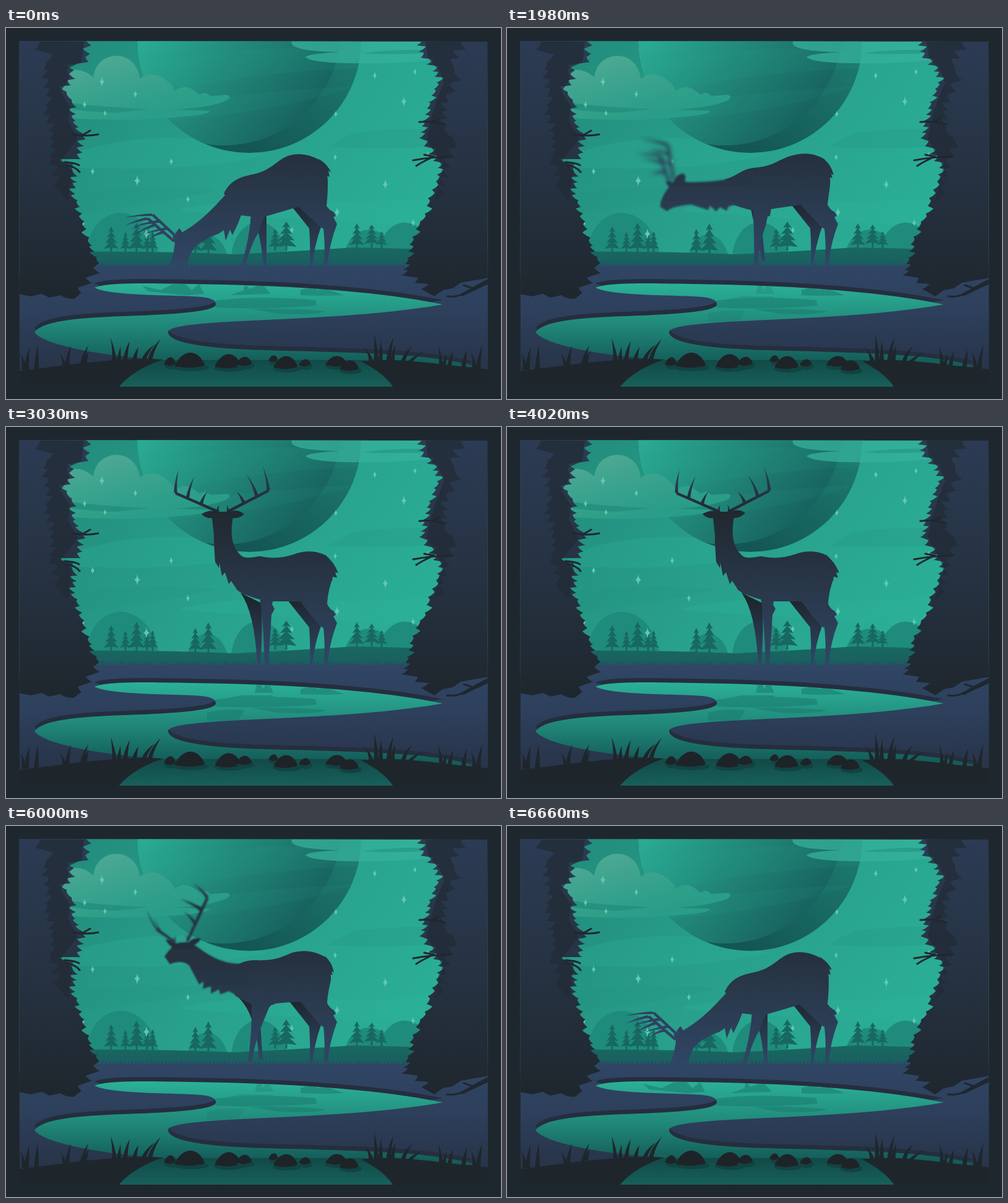
These frames come from a looping animation (800 px wide and 600 px high, 9030 ms). An HTML page:

```html
<!DOCTYPE html>
<html lang="en">
<head>
<meta charset="utf-8">
<title>Deer by the pond</title>
<style>
html, body { margin: 0; width: 100%; height: 100%; overflow: hidden; background: #1f272e; }
svg { display: block; width: 100%; height: 100%; }
</style>
</head>
<body>
<svg viewBox="0 0 800 600">
  <defs>
    <clipPath id="stage"><path d="M21 21L778 22 779 580H22Z"/></clipPath>
    <linearGradient id="sky" x1="0" y1=".25" x2="1" y2=".6"><stop stop-color="#228b7b"/><stop offset=".45" stop-color="#289f8b"/><stop offset="1" stop-color="#2bb198"/></linearGradient>
    <linearGradient id="moon" gradientUnits="userSpaceOnUse" x1="235" y1="10" x2="455" y2="205"><stop stop-color="#2aaa93"/><stop offset=".4" stop-color="#228a7b"/><stop offset="1" stop-color="#165d5b"/></linearGradient>
    <linearGradient id="shade" gradientUnits="userSpaceOnUse" x1="540" y1="20" x2="400" y2="200"><stop stop-color="#1d7a6f"/><stop offset="1" stop-color="#145655"/></linearGradient>
    <linearGradient id="cloud" gradientUnits="userSpaceOnUse" x1="170" y1="45" x2="200" y2="150"><stop stop-color="#4ca893"/><stop offset=".6" stop-color="#35a18c"/><stop offset="1" stop-color="#2a9d88"/></linearGradient>
    <linearGradient id="far" x2="0" y2="1"><stop stop-color="#18695f"/><stop offset="1" stop-color="#1b5a61"/></linearGradient>
    <linearGradient id="land" gradientUnits="userSpaceOnUse" x1="0" y1="384" x2="0" y2="560"><stop stop-color="#304665"/><stop offset=".45" stop-color="#2d3f5b"/><stop offset="1" stop-color="#273347"/></linearGradient>
    <linearGradient id="water" gradientUnits="userSpaceOnUse" x1="0" y1="414" x2="0" y2="540"><stop stop-color="#2bb097"/><stop offset=".5" stop-color="#218a7b"/><stop offset="1" stop-color="#145d59"/></linearGradient>
    <linearGradient id="pool" x2="0" y2="1"><stop stop-color="#124a48"/><stop offset="1" stop-color="#17605a"/></linearGradient>
    <linearGradient id="wood" gradientUnits="userSpaceOnUse" x1="0" y1="22" x2="0" y2="430"><stop stop-color="#2c3b54"/><stop offset=".5" stop-color="#263343"/><stop offset="1" stop-color="#1f272e"/></linearGradient>
    <linearGradient id="coat" gradientUnits="userSpaceOnUse" x1="0" y1="130" x2="0" y2="384"><stop stop-color="#20282f"/><stop offset=".35" stop-color="#263240"/><stop offset="1" stop-color="#304665"/></linearGradient>
    <linearGradient id="dim" gradientUnits="userSpaceOnUse" x1="0" y1="278" x2="0" y2="375"><stop stop-color="#1e252c"/><stop offset="1" stop-color="#2f4564"/></linearGradient>
    <linearGradient id="horn" gradientUnits="userSpaceOnUse" x1="0" y1="70" x2="0" y2="340"><stop stop-color="#2d3d5a"/><stop offset=".25" stop-color="#212931"/><stop offset=".5" stop-color="#29384f"/><stop offset="1" stop-color="#2e4362"/></linearGradient>
    <filter id="soft" filterUnits="userSpaceOnUse" x="150" y="30" width="330" height="380"><feGaussianBlur id="softBlur"/></filter>
    <filter id="smear" filterUnits="userSpaceOnUse" x="150" y="30" width="330" height="380"><feGaussianBlur id="smearBlur"/></filter>
  </defs>
  <g clip-path="url(#stage)">
    <path fill="url(#sky)" d="M20 20H780V400H20Z"/>
    <g fill="#2fb49b" opacity=".25">
      <path d="M100 205Q270 150 420 205Q300 235 100 225Z"/>
      <path d="M284 292Q400 270 560 282L700 275V320Q420 308 284 296Z"/>
    </g>
    <path fill="#21907f" opacity=".25" d="M560 170Q640 160 700 165V190Q620 198 520 192ZM100 270Q200 250 340 262Q230 290 100 300Z"/>
    <circle cx="393" cy="21" r="181" fill="url(#shade)"/>
    <clipPath id="disc"><circle cx="393" cy="21" r="181"/></clipPath>
    <g clip-path="url(#disc)">
      <circle cx="352" cy="0" r="190" fill="url(#moon)"/>
      <path fill="#30b199" opacity=".08" d="M212 60Q400 20 560 40L570 65Q400 70 230 110ZM240 130Q400 100 560 95Q450 135 260 150Z"/>
    </g>
    <path fill="url(#cloud)" d="M90 72Q120 60 141 80C146 33 212 33 216 82Q238 66 262 87 271 94 272 102Q290 88 308 104L313 108Q322 101 330 110L356 108Q366 110 357 117Q330 129 270 132L329 134Q328 140 290 143Q200 152 105 146L85 130Z"/>
    <path fill="#25917f" d="M98 120Q150 128 232 131L180 137Q130 136 100 130Z"/>
    <path fill="#36b29b" opacity=".75" d="M463 20Q455 31 490 36Q515 39 540 39Q490 41 484 47Q492 56 560 57Q640 58 690 51V20Z"/>
    <path fill="#289e8a" d="M575 41Q630 33 690 36V40Q630 44 575 41Z"/>
    <g fill="#1f8b7c">
      <path d="M130 362C138 280 228 276 246 362ZM294 368C300 324 346 322 358 368ZM364 368C372 297 444 295 454 368ZM548 360C560 316 610 314 630 360ZM600 362C615 300 670 298 695 362Z"/>
    </g>
    <path fill="url(#far)" d="M20 362Q250 360 370 366Q460 362 560 355Q640 356 780 362V392H20Z"/>
    <g id="pines" fill="#176860"></g>
    <g id="stars" fill="#62c9b1"></g>
    <g id="deer" fill="url(#coat)">
      <path id="farLeg" fill="url(#dim)"/>
      <path fill="url(#dim)" d="M455 280L490 324Q492 350 491 384L495 384Q499 350 509 322L482 280Z"/>
      <path id="tail"/>
      <path id="torso"/>
      <path id="nearLeg"/>
      <g id="head"><path id="neck"/><path id="earL"/><path id="earR"/></g>
      <g id="antlers" fill="url(#horn)"></g>
    </g>
    <path id="turf" fill="url(#land)"/>
    <path id="rim" fill="#252e3e" transform="translate(0 -7)"/>
    <path id="pond" fill="url(#water)"/>
    <clipPath id="pondClip"><path id="pondEdge"/></clipPath>
    <g clip-path="url(#pondClip)" fill="#1c7d70" opacity=".6">
      <path d="M338 441Q400 432 500 440L502 449Q420 456 338 452ZM398 455Q450 452 518 458Q500 465 440 462ZM476 424L490 420 492 414H498L502 424 516 420 518 414 524 424 546 432Q510 434 476 432Z"/>
      <path id="refDown" d="M220 417L250 424 270 414H290L300 424 312 414 320 430 290 432 230 426ZM362 432L384 424 386 414 394 422 414 414 428 430Z"/>
      <path id="refUp" d="M325 462Q350 455 385 458L375 475H325ZM350 440L380 434H430L445 446 360 452ZM402 430L406 414H411L416 424 420 414H425L432 430Z"/>
    </g>
    <path fill="url(#pool)" d="M245 537H580C600 550 615 565 626 580H182C195 560 220 545 245 537Z"/>
    <path fill="#1e262c" d="M20 555C100 545 180 532 254 536C220 548 198 562 182 581H20ZM626 581C612 560 592 549 574 539C640 532 710 546 780 552V581Z"/>
    <g id="stones" fill="#1e2328"></g>
    <g id="blades" fill="#1e262c"></g>
    <g id="woods"></g>
    <g fill="none" stroke="#1f272f" stroke-width="3" stroke-linecap="round">
      <path d="M108 172Q130 176 149 172M122 174L136 166M95 217Q112 218 118 222M98 222Q112 224 119 233M720 208Q690 208 658 214M692 208L676 205M685 211Q672 217 663 223M710 156Q690 150 668 152M700 146L690 152M778 408Q755 420 742 428Q730 436 713 434M752 420L740 416"/>
      <path stroke-width="5" d="M778 412Q752 424 738 431"/>
    </g>
  </g>
</svg>
<script>
const $ = id => document.getElementById(id);
const LOOP = 9030;
const path = d => `<path d="${d}"/>`;

// Scenery
const sparkles = [[155,87,8],[209,107,6],[127,124,6],[160,138,5],[267,216,6],[140,232,6],[212,247,9],[294,277,6],[124,316,6],[227,333,9],
  [596,77,6],[661,71,5],[643,119,8],[533,139,5],[532,209,5],[613,253,8],[535,298,8],[462,327,6],[658,315,6],[682,205,5]];
$('stars').innerHTML = sparkles.map(([x, y, r]) => {
  const s = r * .55;
  return path(`M${x} ${y - r}Q${x + 1} ${y - 1} ${x + s} ${y}Q${x + 1} ${y + 1} ${x} ${y + r}Q${x - 1} ${y + 1} ${x - s} ${y}Q${x - 1} ${y - 1} ${x} ${y - r}Z`);
}).join('');

function pine([x, top, base, w]) {
  const h = base - top - 4;
  let d = `M${x - 1.5} ${base + 2}V${top + 5}H${x + 1.5}V${base + 2}Z`;
  for (let i = 0; i < 4; i++) {
    const y = top + h * (i + 1) / 4, r = w / 2 * (.4 + .2 * i);
    d += `M${x} ${top + h * i / 5}L${x + r} ${y}L${x} ${y - 2}L${x - r} ${y}Z`;
  }
  return path(d);
}
$('pines').innerHTML = [[170,321,361,24],[193,330,361,18],[211,315,361,28],[228,331,361,18],[237,329,361,18],[306,325,364,22],[327,316,364,28],
  [435,325,358,22],[453,313,358,34],[567,316,355,24],[591,318,353,26],[607,329,355,20]].map(pine).join('');

let turf = 'M20 386';
for (let x = 22; x < 780; x += 6) {
  const h = 2 + 3 * Math.abs(Math.sin(x * 1.7)) * Math.abs(Math.sin(x * .13));
  turf += `L${x} 385L${x + 2} ${384 - h * 1.3}L${x + 4} 385`;
}
$('turf').setAttribute('d', turf + 'L780 386V580H20Z');

const shore = 'M143 420C165 411 230 413 300 414C450 416 600 425 706 447C610 464 500 468 400 473C310 477 262 482 262 492C264 512 340 519 420 521C560 525 690 526 757 547L640 560 626 580H182L245 536C150 530 60 512 46 492C60 474 110 469 190 466C280 463 335 458 339 448C341 438 325 435 300 434C250 432 165 432 143 420Z';
for (const id of ['rim', 'pond', 'pondEdge']) $(id).setAttribute('d', shore);

const mounds = [[265,534,545,9],[297,523,548,24],[359,526,549,21],[385,533,545,12],[432,532,539,7],[452,530,550,19],[483,538,546,9],[534,531,546,17],[555,538,553,15]];
$('stones').innerHTML = mounds.map(([x, top, base, r]) =>
  `<ellipse cx="${x + 2}" cy="${base + 1}" rx="${r * 1.2}" ry="6" fill="#114341"/>` +
  path(`M${x - r} ${base - 3}C${x - r * .5} ${top - 3} ${x + r * .5} ${top - 6} ${x + r} ${base - 4}Q${x + r} ${base} ${x + r * .5} ${base}Q${x} ${base + 3} ${x - r * .7} ${base}Q${x - r - 2} ${base} ${x - r} ${base - 3}Z`)).join('');

// Each blade: base x, tip x, tip y
const blades = [[29,24,527],[33,38,516],[49,51,513],[95,87,526],[98,105,513],[122,133,513],[126,134,522],[175,169,501],[182,185,515],[192,200,506],[207,214,516],[232,250,503],[222,240,512],
  [590,577,514],[598,595,495],[605,606,506],[618,626,501],[624,629,513],[641,656,514],[650,673,525],[703,699,515],[707,712,527],[716,723,522],[739,745,520],[763,770,513],[757,752,525]];
$('blades').innerHTML = blades.map(([b, x, y]) => {
  const foot = 553 - 12 * Math.exp(-(((Math.abs(b - 412) - 195) / 60) ** 2));
  return path(`M${b - 4} ${foot}Q${b - 2} ${(foot + y) / 2} ${x} ${y}Q${b + 4} ${(foot + y) / 2 + 4} ${b + 4} ${foot}Z`);
}).join('');

// Drooping needles along a line of [x, y] anchors; side is the way they point
function needles(line, side, depth, step) {
  let d = '', n = 0;
  for (let i = 0; i + 1 < line.length; i++) {
    const [x0, y0] = line[i], [x1, y1] = line[i + 1];
    const count = Math.max(1, Math.round((y1 - y0) / step));
    for (let k = 0; k < count; k++, n++) {
      const x = x0 + (x1 - x0) * k / count, y = y0 + (y1 - y0) * k / count;
      const dep = depth * (.8 + .4 * Math.sin(n * 2.3));
      d += `L${x - side * dep} ${y - step + 3}Q${x - side * dep * .4} ${y - 2} ${x + side * 2} ${y}`;
    }
  }
  return d;
}
const leftEdge = [[136,28],[132,55],[108,68],[110,82],[96,103],[112,128],[110,150],[127,180],[119,212],[97,220],[114,240],[110,268],[121,300],[128,325],[137,352],[149,380],[150,396],[137,412],[120,428],[110,438]];
const rightEdge = [[666,28],[672,48],[691,70],[698,88],[685,120],[676,150],[670,178],[684,204],[700,226],[697,248],[684,275],[679,300],[664,325],[654,350],[650,372],[641,400],[662,412],[684,432]];
const leftDark = [[48,35],[66,55],[58,80],[66,110],[62,140],[72,180],[70,220],[84,270]];
const rightDark = [[742,35],[722,62],[734,84],[715,120],[709,160],[728,192],[712,240],[704,280]];
const dark = 'fill="#222b36"';
$('woods').innerHTML =
  `<path fill="url(#wood)" d="M20 20H130${needles(leftEdge, 1, 9, 11)}L110 438Q95 438 88 432L70 436 58 430 40 434 20 430Z"/>` +
  `<path fill="url(#wood)" d="M780 20H672${needles(rightEdge, -1, 9, 11)}L692 434 706 424 722 421 735 412 780 404Z"/>` +
  `<path ${dark} opacity=".75" d="M84 270L52 22${needles(leftDark, -1, 9, 15)}L100 280L108 220 88 215 116 180 100 150 104 128 88 103 102 82 98 66 122 55 126 22 52 22Z"/>` +
  `<path ${dark} opacity=".75" d="M704 280L738 22${needles(rightDark, 1, 9, 15)}L692 280 706 226 694 204 680 178 686 150 695 120 708 88 701 70 682 48 678 22 738 22Z"/>`;

// Deer poses: grazing, rising, sinking, standing. Matching paths are blended number by number.
const hind = 'Q523 295 530 298L533 304 529 306 535 317Q524 345 519 384L514 384Q516 350 513 325L508 322';
const graze = {
  torso: `M352 268C362 245 382 240 402 236C428 230 438 214 455 207C472 201 490 204 508 214Q521 226 520 255Q520 270 518 288${hind}Q485 300 472 289Q440 299 418 305Q400 306 380 303Z`,
  tail: 'M506 212Q520 221 525 233L521 231 523 241 519 239 519 245L508 228Z',
  neck: 'M375 250C352 268 330 305 284 331L279 328 274 336L273 348Q270 370 264 385L293 385Q296 362 310 350L330 338 343 333 352 327 355 344 362 326 366 335 375 316 380 303L395 295Z',
  nearLeg: 'M396 300Q394 340 380 384L387 384Q398 345 408 331L413 316 419 304 428 290Z',
  farLeg: 'M404 318Q412 340 416 384L421 384Q421 340 421 302Z',
  earL: 'M276 338Q273 334 270 333Q269 342 274 350Z',
  earR: 'M285 333Q284 327 280 324Q273 330 275 340Z',
  hornL: '272 345 229 308 192 320 207 335 232 341',
  hornR: '277 339 237 302 191 307 203 323 222 334'
};
const rise = {
  torso: `M352 245C372 240 378 228 400 226C430 224 436 214 458 207C478 200 500 203 514 213Q524 228 522 255Q520 270 518 286${hind}Q488 300 474 286Q440 291 425 293Q412 303 366 286Z`,
  tail: 'M512 212Q524 221 528 238L524 236 526 243 521 241 521 247L510 228Z',
  neck: 'M385 236C360 246 335 250 290 250L275 240 266 252L258 262Q246 280 247 290L258 297Q268 288 298 286L325 295 328 288 338 297 344 290 355 296 358 289 369 286 382 290L395 292Z',
  nearLeg: 'M397 290Q400 330 399 384L406 384Q408 345 418 320L421 305 425 304 428 285Z',
  farLeg: 'M394 292Q404 335 412 378L418 377Q411 330 412 300Z',
  earL: 'M268 252Q262 246 257 249Q258 256 264 260Z',
  earR: 'M286 250Q291 238 283 236Q271 238 268 252Z',
  hornL: '262 252 247 207 208 205 215 212 230 238',
  hornR: '269 247 259 190 212 180 225 195 240 207'
};
const sink = {
  torso: `M365 228C380 222 385 217 402 217C430 218 442 214 462 205C482 199 503 203 517 213Q526 228 525 250Q520 270 519 286${hind}Q488 300 476 284Q455 285 436 287Q412 300 370 274Z`,
  tail: 'M515 210Q527 220 530 237L526 235 528 241 523 240 523 247L513 228Z',
  neck: 'M392 222C360 226 335 215 308 194L293 187 279 188L270 193Q262 202 256 210L265 223Q283 215 296 225L312 256 319 251 318 263 331 259 331 271 344 264 346 272 360 267L385 280Z',
  nearLeg: 'M397 285Q398 330 391 382L397 382Q405 340 412 326L420 306 425 294 436 280Z',
  farLeg: 'M372 274Q404 300 409 378L415 376Q411 330 410 295Z',
  earL: 'M280 194Q270 182 258 183Q262 192 272 197Z',
  earR: 'M292 192Q300 178 315 181Q312 189 300 194Z',
  hornL: '273 187 243 166 228 136 240 150 255 172',
  hornR: '293 186 326 115 303 92 281 117 288 138'
};
const stand = {
  torso: `M366 190C370 214 392 213 410 209C430 213 448 212 465 206C480 200 500 199 515 207Q527 220 526 250Q520 268 519 286${hind}Q488 300 476 282Q455 282 432 282Q398 280 372 262Z`,
  tail: 'M515 206Q530 218 537 236L532 235 535 244 528 242 527 250L515 230Z',
  neck: 'M392 216C366 202 361 180 367 145L365 137 343 137L333 147Q335 165 336 175L336 185Q337 205 338 218L344 228 345 220 349 241 354 235 360 254 364 249 374 264 383 270L400 275Z',
  nearLeg: 'M408 262Q416 310 418 384L424 384Q427 340 429 304L434 294 430 287 434 270Z',
  farLeg: 'M379 268Q402 300 406 384L411 384Q415 330 413 285Z',
  earL: 'M345 137Q326 133 316 141Q324 149 335 147Z',
  earR: 'M364 136Q376 133 385 141Q376 149 365 147Z',
  hornL: '343 137 274 107 279 69 305 79 326 104',
  hornR: '358 137 424 103 415 64 389 77 372 104'
};

function mix(a, b, k) {
  if (k <= 0) return a;
  if (k >= 1) return b;
  const to = b.match(/[\d.]+/g);
  let i = 0;
  return a.replace(/[\d.]+/g, v => (+v + (to[i++] - v) * k).toFixed(2));
}

function antler(text, lean) {
  const v = text.split(' ').map(Number);
  const [b, e, tip, t1, t2] = [0, 2, 4, 6, 8].map(i => [v[i], v[i + 1]]);
  const len = Math.hypot(e[0] - b[0], e[1] - b[1]);
  const u = [(e[0] - b[0]) / len, (e[1] - b[1]) / len];
  const n = [-u[1] * 2.2, u[0] * 2.2];
  const at = (p, q, k) => `${p[0] + q[0] * k} ${p[1] + q[1] * k}`;
  const on = k => [b[0] + (e[0] - b[0]) * k, b[1] + (e[1] - b[1]) * k];
  const spike = (p, q, w) => {
    const m = [(p[0] + q[0]) / 2, (p[1] + q[1]) / 2];
    return path(`M${at(p, u, w)}Q${at(m, u, 3 + w / 2)} ${q}Q${at(m, u, 3 - w / 2)} ${at(p, u, -w)}Z`);
  };
  return path(`M${at(b, n, 1)}L${at(e, n, 1)}L${at(e, n, -1)}L${at(b, n, -1)}Z`) +
    spike(e, tip, 3) + spike(on(.72), t1, 3) + spike(on(.4), t2, 3) + spike(b, [b[0] + lean, b[1] - 11], 2);
}

const span = (t, a, b) => Math.min(1, Math.max(0, (t - a) / (b - a)));
const easeIn = k => k * k;
const easeOut = k => 1 - (1 - k) ** 3;
const flick = (t, a, b, n) => Math.sin(span(t, a, b) * Math.PI * n) ** 2;
const bump = (t, c, w) => Math.exp(-(((t - c) / w) ** 2));

function poseAt(t) {
  if (t < 1980) return [graze, rise, easeIn(span(t, 1800, 1980))];
  if (t < 5400) return [rise, stand, easeOut(span(t, 1980, 2430))];
  if (t < 6000) return [stand, sink, easeIn(span(t, 5400, 6000))];
  return [sink, graze, easeOut(span(t, 6000, 6660))];
}

function draw(t) {
  const [a, b, k] = poseAt(t);
  for (const id of ['torso', 'tail', 'neck', 'nearLeg', 'farLeg', 'earL', 'earR']) $(id).setAttribute('d', mix(a[id], b[id], k));
  $('antlers').innerHTML = antler(mix(a.hornL, b.hornL, k), 2) + antler(mix(a.hornR, b.hornR, k), -2);

  const wag = -10 * flick(t, 60, 960, 2) - 20 * flick(t, 990, 1440, 2);
  $('tail').setAttribute('transform', `rotate(${wag} 508 216)`);
  const ear = 18 * flick(t, 3030, 3930, 3) - 10 * flick(t, 3960, 4170, 1);
  $('earR').setAttribute('transform', `rotate(${ear} 366 141)`);

  const blur = 3.2 * bump(t, 1990, 120) + 1.8 * bump(t, 6040, 130);
  const moving = blur > .1;
  $('smearBlur').setAttribute('stdDeviation', blur);
  $('softBlur').setAttribute('stdDeviation', blur * .55);
  $('antlers').setAttribute('filter', moving ? 'url(#smear)' : 'none');
  $('head').setAttribute('filter', moving ? 'url(#soft)' : 'none');

  const weight = pose => (a === pose ? 1 - k : 0) + (b === pose ? k : 0);
  $('refDown').setAttribute('opacity', weight(graze));
  $('refUp').setAttribute('opacity', weight(stand) + .5 * (weight(rise) + weight(sink)));
}

const start = performance.now();
function tick() {
  draw((performance.now() - start) % LOOP);
  requestAnimationFrame(tick);
}
draw(0);
requestAnimationFrame(tick);
</script>
</body>
</html>
```
